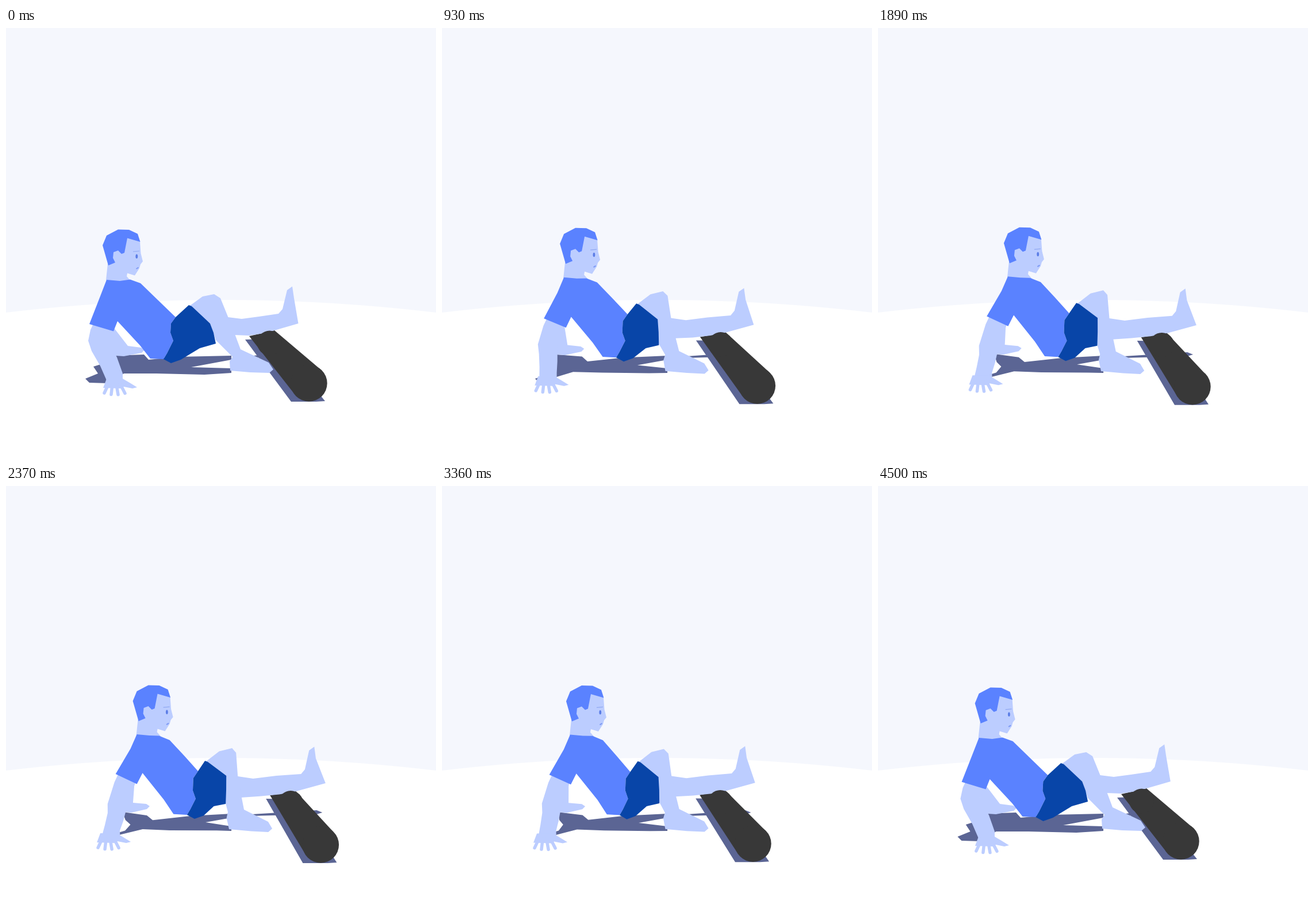
These frames come from a looping animation (748 px wide and 748 px high, 4530 ms). An HTML page with a canvas:

```html
<!DOCTYPE html>
<html lang="en">
<head>
<meta charset="utf-8">
<title>Leg roll exercise</title>
<style>
  html, body { margin: 0; width: 100%; height: 100%; overflow: hidden; background: #f5f7fd; }
  canvas { display: block; width: 748px; height: 748px; }
</style>
</head>
<body>
<canvas id="stage" width="748" height="748"></canvas>
<script>
const ctx = document.getElementById('stage').getContext('2d');
const LOOP = 4530, STEP = 30;
const SKIN = '#bccdff', SHIRT = '#5a82ff', SHORTS = '#0845a8', SHADE = '#5b6594', ROLLER = '#383838';

const list = s => s.split(' ').map(p => p.split(',').map(Number));

// Outlines in the rest pose.
const shirt = list('175,438 198,440 216,437.5 234,444 265,474 295,503 287,514 286,530 291,544 280,566 274,576 251,575 233,552 194,510 187,527.5 145,515 163,469');
const shorts = list('318,482 323,484 355,514 361,530 365,549 337,557 304,577 287,583 274,576 280,566 291,544 286,530 287,514 295,503');
const bentLeg = list('320,483 342,467 362,463 373,470 386,502 399,535 408,559 440,574 457,582 465,594 458,600 425,599 390,596 389,580 394,572 365,543 355,514');
const raisedLeg = list('386,503 410,506 440,502 474,497 481,489 489,456 498,449.5 501,470 508.5,514 467,526 445,531.5 423,535 397,534 380,520');
const nearArm = list('155,508 147,525 143,544 149,562 164,588 175,613 203,613 203,601 193,573 177,541 187,525 185,515');
const farArm = list('175,520 188,522 212,553 235,556 241,560 236,565 205,571 190,570 177,543');
const palm = list('175,610 169,626 200,627 205,624 220,627 228,625 215,617 203,610');
const shadow = list('138,610 160,601 152,589 168,584 190,570 240,568 248,577 300,572 392,570 392,577 322,590 392,592 392,600 345,603 262,601 205,601 178,618 145,617');
const head = list('210,364 233,371 234.5,392 238,406 234,411 232,418 224,430.5 211,426.5 210,432 217,440 205,446 178,446 174,438 177,410 184,392');
const hair = list('175,361 195,350.5 214,351 229,358 233.5,372 211,365.5 206,391 201,393 195,387 187,390 186,400 190,408 178,413 168,378');

// Pins: rest x, y and how far they travel in the forward pose.
const torsoPins = list('175,438,53,-6 234,444,51,-2 265,474,45,-5 295,503,39,-7 289,538,39,0 280,578,41,-4 200,515,44,-11 148,515,46,-14 187,527,41,-9 163,469,54,-12 320,483,28,-4 355,514,28,-10 363,545,17,4');
const legPins = list('323,484,28,-4 362,463,31,-7 373,470,27,-6 386,502,17,2 399,535,11,8 365,543,17,9 394,572,-8,-5 408,559,6,4 440,574,0,2 390,592,-2,1 460,592,-2,2 440,502,30,2 445,531,30,5 474,497,39,4 495,452,38,4 508,514,47,3 467,526,34,6');
const armPins = list('150,515,44,-14 187,525,38,-8 143,544,34,9 177,541,34,16 164,588,8,2 193,573,11,10 175,613,-8,-5 203,606,-5,-2');
const farPins = list('182,521,36,-5 212,553,9,-2 240,560,9,-3 195,570,13,-3 177,543,28,2');
const shadowPins = list('138,610,34,0 152,589,65,0 168,584,40,-3 190,570,13,-3 240,568,5,5 300,572,20,2 322,590,25,-5 392,590,0,0 262,601,23,-2 205,601,33,-4 178,618,2,-7');

// Smooth periodic curve through [time, value] keys.
function track(...keys) {
  const n = keys.length;
  const at = i => {
    const turn = Math.floor(i / n), [t, v] = keys[i - turn * n];
    return [t + turn * LOOP, v];
  };
  const slope = i => {
    const [t0, v0] = at(i - 1), [t1, v1] = at(i + 1);
    return (v1 - v0) / (t1 - t0);
  };
  return t => {
    let i = n - 1;
    while (keys[i][0] > t) i--;
    const [t0, v0] = at(i), [t1, v1] = at(i + 1), d = t1 - t0, u = (t - t0) / d, w = 1 - u;
    return w * w * (v0 * (1 + 2 * u) + slope(i) * d * u) + u * u * (v1 * (3 - 2 * u) - slope(i + 1) * d * w);
  };
}

const upperAt = track([0, 0], [250, -.16], [540, .04], [930, .7], [1300, .89], [1890, .96], [2880, 1], [3360, .905], [3900, .44], [4320, .06]);
const lowerAt = track([0, 0], [250, -.02], [540, .26], [930, .72], [1300, .88], [1890, .965], [2880, 1], [3360, .77], [3900, .38], [4320, .07]);
const rollerAt = track([0, 0], [200, .05], [540, .75], [930, 1.07], [1890, 1], [2880, 1], [3360, .7], [3900, .3], [4320, .05]);

const mix = (a, b, k) => a + (b - a) * k;

// Each point follows the nearby pins, weighted by closeness.
function warp(points, pins, progress) {
  return points.map(([x, y]) => {
    let sum = 0, dx = 0, dy = 0;
    for (const [px, py, mx, my] of pins) {
      const w = ((x - px) ** 2 + (y - py) ** 2 + 1) ** -1.5;
      sum += w;
      dx += w * mx;
      dy += w * my;
    }
    const k = progress(x) / sum;
    return [x + dx * k, y + dy * k];
  });
}

function fill(color, points) {
  ctx.fillStyle = color;
  ctx.beginPath();
  points.forEach(([x, y]) => ctx.lineTo(x, y));
  ctx.fill();
}

function disc(color, x, y, rx, ry = rx) {
  ctx.fillStyle = color;
  ctx.beginPath();
  ctx.ellipse(x, y, rx, ry, 0, 0, Math.PI * 2);
  ctx.fill();
}

function line(color, width, x0, y0, x1, y1) {
  ctx.strokeStyle = color;
  ctx.lineWidth = width;
  ctx.beginPath();
  ctx.moveTo(x0, y0);
  ctx.lineTo(x1, y1);
  ctx.stroke();
}

function shifted(dx, dy, paint) {
  ctx.save();
  ctx.translate(dx, dy);
  paint();
  ctx.restore();
}

function drawHand() {
  fill(SKIN, palm);
  ctx.lineCap = 'round';
  for (let i = 0; i < 4; i++) line(SKIN, 5.5, 178 + 7 * i, 620, 171 + 12 * i, 635 + 3 * Math.sin(i));
  ctx.lineCap = 'butt';
}

function drawHead() {
  fill(SKIN, head);
  fill(SHIRT, hair);
  line('#91a9f2', 1.2, 221, 389, 232, 388);
  disc('#5b7de6', 227.3, 397.3, 1.9, 3.8);
  line('#7e9af4', 2, 226.5, 419, 230.5, 416.5);
}

function draw(t) {
  const up = upperAt(t), low = lowerAt(t), near = rollerAt(t), far = Math.min(low, near);
  // The movement passes from the shoulders on to the legs.
  const progress = x => mix(up, low, Math.min(1, Math.max(0, (x - 230) / 120)));
  const part = (color, points, pins) => fill(color, warp(points, pins, progress));

  const nx = mix(527, 547, near), ny = mix(618, 624, far);
  const lx = mix(423, 459, far), ly = mix(536, 538, far);
  const rx = mix(467, 504, far), ry = mix(526, 531, far);
  const tip = 496 + 54 * low;

  ctx.fillStyle = '#f5f7fd';
  ctx.fillRect(0, 0, 748, 748);
  disc('#fff', 374, 3653, 3180);

  part(SHADE, shadow, shadowPins);
  fill(SHADE, [[412, 572], [tip - 10, 564], [tip, 568], [tip - 10, 571], [425, 574]]);
  fill(SHADE, [[lx - 7, ly + 6], [rx, ry + 14], [nx + 28, ny + 31], [nx + 12, ny + 32], [nx - 31, ny + 32]]);
  fill(ROLLER, [[lx, ly], [rx, ry], [nx + 21.4, ny - 23], [nx - 26, ny + 17.8]]);
  disc(ROLLER, nx, ny, 31.7);

  part(SKIN, farArm, farPins);
  part(SKIN, nearArm, armPins);
  shifted(-11 * up, -6 * up, drawHand);
  part(SKIN, raisedLeg, legPins);
  disc(ROLLER, (lx + rx) / 2 + 13.5, (ly + ry) / 2 + 17, 21.5);
  part(SKIN, bentLeg, legPins);

  shifted(53 * up, -4 * up, drawHead);
  part(SHIRT, shirt, torsoPins);
  part(SHORTS, shorts, torsoPins);
}

function frame() {
  const t = performance.now() % LOOP;
  draw(Math.floor(t / STEP) * STEP);
  requestAnimationFrame(frame);
}
frame();
</script>
</body>
</html>
```
